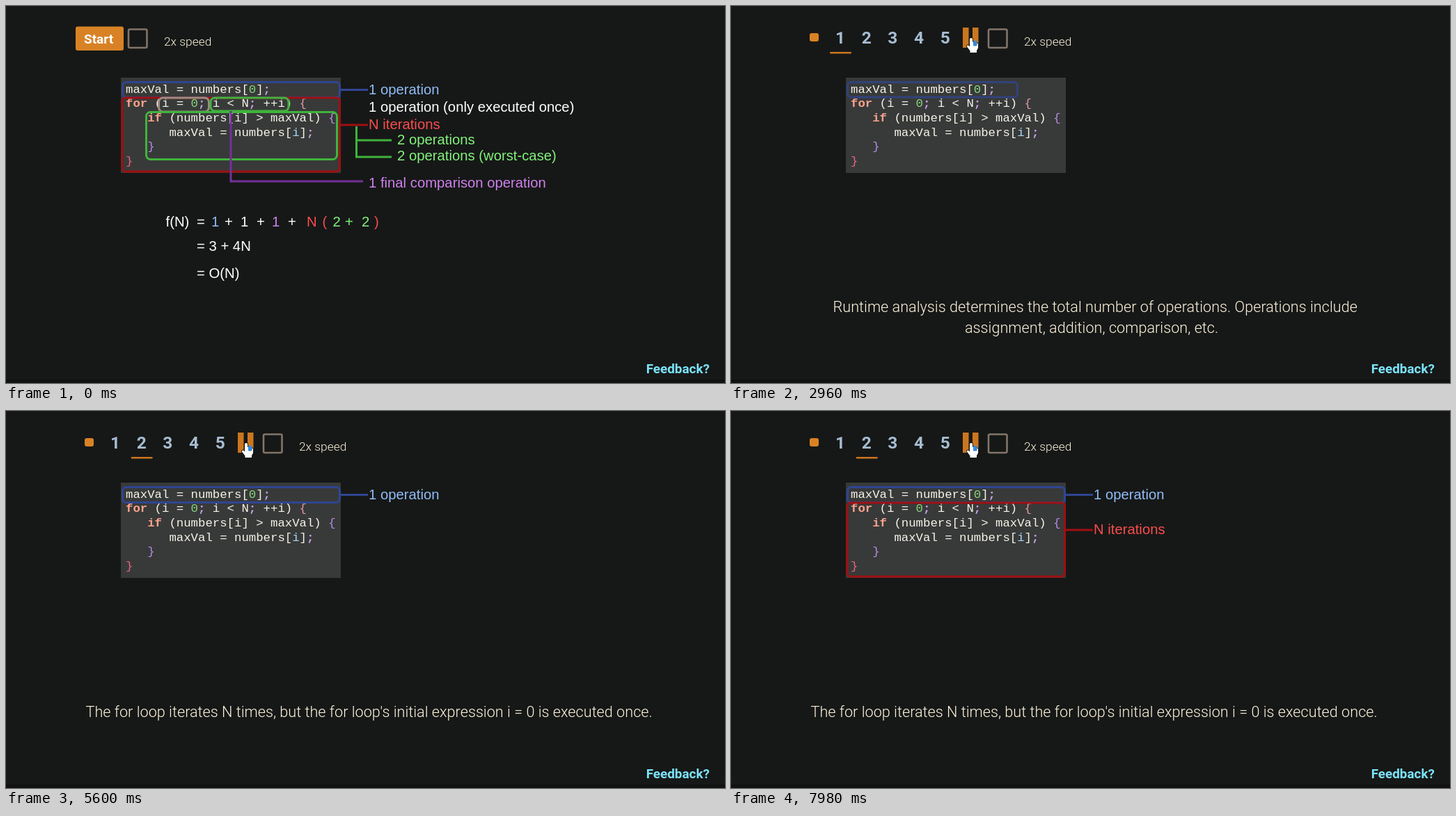
Write an HTML page with a canvas that moves like this. It is 1033 px wide and 542 px high and loops after 8000 ms.

```html
<!DOCTYPE html>
<html lang="en">
<head>
<meta charset="utf-8">
<title>Runtime analysis</title>
<style>
  html, body { margin: 0; width: 100%; height: 100%; overflow: hidden; background: #161817; }
  canvas { display: block; width: 1033px; height: 542px; }
</style>
</head>
<body>
<canvas id="stage" width="1033" height="542"></canvas>
<script>
const ctx = document.getElementById('stage').getContext('2d');
const LOOP = 8000;
const UI = 'Roboto, sans-serif';
const LABEL = '20.3px "Liberation Sans", Arial, sans-serif';
const MONO = '17.33px "Courier New", "Liberation Mono", monospace';
const C = {
  orange: '#d88225', control: '#cb761f', cream: '#fff4dd', blue: '#2f4592', blueText: '#91bcf8',
  red: '#a00f11', redText: '#f84d4d', green: '#40b33c', greenText: '#83f27c',
  purple: '#74309a', purpleText: '#cf80ee', tan: '#9c8c7e', box: '#82756a'
};
const BLUE_BOX = [167.5, 109.5, 312, 22, C.blue];
const RED_BOX = [167, 132, 312.5, 106, C.red];

const clamp = v => Math.max(0, Math.min(1, v));
const swing = (t, start, length) => 0.5 - Math.cos(Math.PI * clamp((t - start) / length)) / 2;
const mix = (a, b, k) => a + (b - a) * k;

function text(str, x, y, color, font = LABEL, align = 'left') {
  ctx.font = font;
  ctx.textAlign = align;
  ctx.fillStyle = color;
  ctx.fillText(str, x, y);
}

function fillBox(x, y, w, h, color, r = 0) {
  ctx.fillStyle = color;
  ctx.beginPath();
  ctx.roundRect(x, y, w, h, r);
  ctx.fill();
}

function frame(x, y, w, h, color, r = 5, width = 3) {
  ctx.strokeStyle = color;
  ctx.lineWidth = width;
  ctx.beginPath();
  ctx.roundRect(x, y, w, h, r);
  ctx.stroke();
}

function poly(points, color, width = 3) {
  ctx.strokeStyle = color;
  ctx.lineWidth = width;
  ctx.beginPath();
  points.forEach(([x, y]) => ctx.lineTo(x, y));
  ctx.stroke();
}

function faded(alpha, draw) {
  if (alpha <= 0) return;
  ctx.save();
  ctx.globalAlpha = alpha;
  draw();
  ctx.restore();
}

// Code runs: [line, column, text, kind]
const KINDS = { n: '#f6f3e9', k: '#ffa38c', g: '#86d67c', s: '#cda0ee', v: '#b98bea', o: '#e39aa8', p: '#ec6685', b: '#a8d8f8' };
const CODE = [
  [0, 0, 'maxVal = numbers[ ]', 'n'], [0, 17, '0', 'g'], [0, 19, ';', 's'],
  [1, 0, 'for', 'k'], [1, 4, '(i =', 'n'], [1, 9, '0', 'g'], [1, 10, ';', 's'],
  [1, 12, 'i < N', 'n'], [1, 17, ';', 's'], [1, 19, '++i)', 'n'], [1, 24, '{', 'o'],
  [2, 3, 'if', 'k'], [2, 6, '(numbers[i] > maxVal)', 'n'], [2, 28, '{', 'v'],
  [3, 6, 'maxVal = numbers[ ]', 'n'], [3, 23, 'i', 'b'], [3, 25, ';', 's'],
  [4, 3, '}', 'v'], [5, 0, '}', 'p']
];

function drawCode() {
  fillBox(165, 103, 316, 137, '#383a39');
  for (const [line, col, str, kind] of CODE) {
    text(str, 172 + col * 10.4, 124.7 + line * 20.6, KINDS[kind], ('ks'.includes(kind) ? 'bold ' : '') + MONO);
  }
}

function drawSpeed(x) {
  frame(x, 33.5, 26.5, 26.5, C.box, 2, 2.6);
  text('2x speed', x + 51, 56.5, C.cream, '300 17.35px ' + UI);
}

function drawSteps(step, paused) {
  fillBox(113, 39, 13, 12, C.orange, 3);
  for (let i = 0; i < 5; i++) {
    text(String(i + 1), 157 + i * 37.7, 54, '#a6bdd2', 'bold 24.5px ' + UI, 'center');
  }
  fillBox(142 + (step - 1) * 37.7, 66, 31, 2.6, C.control, 1);
  if (paused) {
    ctx.fillStyle = C.control;
    ctx.beginPath();
    ctx.moveTo(333, 32);
    ctx.lineTo(356, 46);
    ctx.lineTo(333, 60);
    ctx.fill();
  } else {
    fillBox(333, 31, 8.5, 29, C.control);
    fillBox(347, 31, 8.5, 29, C.control);
  }
  drawSpeed(370);
}

function drawResult() {
  const white = '#fff';
  frame(...BLUE_BOX);
  frame(...RED_BOX);
  frame(219.5, 132, 72, 20, C.tan, 6);
  frame(294, 132, 112, 19, C.green, 6);
  frame(201.5, 152.5, 274, 68, C.green, 6);
  poly([[481, 120.5], [520, 120.5]], C.blue);
  poly([[481, 171], [520, 171]], C.red);
  poly([[503.5, 173], [503.5, 217], [554, 217]], C.green);
  poly([[503.5, 193], [554, 193]], C.green);
  poly([[323, 151], [323, 252], [513, 252]], C.purple);

  text('1 operation', 521, 127, C.blueText);
  text('1 operation (only executed once)', 521, 152, white);
  text('N iterations', 521, 177, C.redText);
  text('2 operations', 562, 199, C.greenText);
  text('2 operations (worst-case)', 562, 222, C.greenText);
  text('1 final comparison operation', 521, 261, C.purpleText);

  const terms = [
    ['f(N)', 229.5, white], ['=', 274, white], ['1', 295, C.blueText], ['+', 314, white],
    ['1', 337, white], ['+', 360, white], ['1', 382, C.purpleText], ['+', 405, white],
    ['N', 432, C.redText], ['(', 454.5, C.redText], ['2', 469.5, C.greenText],
    ['+', 487, C.greenText], ['2', 511, C.greenText], [')', 529, C.redText]
  ];
  for (const [str, x, color] of terms) text(str, x, 317, color);
  text('= 3 + 4N', 274, 352, white);
  text('= O(N)', 274, 391, white);
}

function growFrame(t, start, [x, y, w, h, color]) {
  const k = swing(t, start, 1000);
  faded(k, () => frame(x, y, mix(14, w, k), mix(20, h, k), color));
}

function callout(t, start, str, baseline, lineY, color, textColor) {
  faded(swing(t, start, 800), () => {
    poly([[481, lineY], [520, lineY]], color);
    text(str, 521, baseline, textColor);
  });
}

function drawCaptions(t) {
  const font = '300 21.66px ' + UI;
  faded(swing(t, 1500, 370) * (1 - swing(t, 4930, 300)), () => {
    text('Runtime analysis determines the total number of operations. Operations include', 146.5, 440, C.cream, font);
    text('assignment, addition, comparison, etc.', 336, 470, C.cream, font);
  });
  faded(swing(t, 5230, 360), () =>
    text('The for loop iterates N times, but the for loop\'s initial expression i = 0 is executed once.', 114.5, 440, C.cream, font));
}

const ARROW = new Path2D('M0 0V15L3.4 12L6 18L8.6 17L6 11H10.5Z');
const HAND = new Path2D('M-2 1.5Q-2 0 0 0Q2 0 2 1.5V6Q4 4.5 5 6.5Q7 5.5 8 7.5Q10 7 10 9V14Q9.5 16 8 18V21H-1.5V18.5L-6 12.5Q-6.5 10 -4 10.5L-2 12.5Z');

function drawPointer(x, y, hand, accent) {
  ctx.save();
  ctx.translate(x, y);
  const shape = hand ? HAND : ARROW;
  ctx.lineJoin = 'round';
  ctx.lineWidth = 1.6;
  ctx.strokeStyle = '#111';
  ctx.stroke(shape);
  ctx.fillStyle = '#fff';
  ctx.fill(shape);
  if (accent) fillBox(3, 4, 5.5, 7.5, '#3388d8', 1);
  ctx.restore();
}

function curve(k, a, b, c) {
  return (1 - k) * (1 - k) * a + 2 * k * (1 - k) * b + k * k * c;
}

function drawCursor(t, paused) {
  if (t < 70) return;
  if (t < 1020) {
    const k = swing(t, 30, 810);
    const x = curve(k, 1000, 420, 146);
    drawPointer(x, curve(k, 509, -60, 47), x < 169);
  } else if (t < 1500) {
    const k = swing(t, 1000, 250);
    drawPointer(mix(146, 137, k), mix(47, 54, k), false);
  } else {
    const k = swing(t, 1500, 800);
    const x = mix(137, 345, k);
    drawPointer(x, curve(k, 54, 0, 46), x > 333, x > 340 && !paused);
  }
}

function draw(t) {
  fillBox(0, 0, 1033, 542, '#161817');
  fillBox(0, 537, 1033, 5, '#101211');
  text('Feedback?', 919.7, 528, '#7be3fb', 'bold 18.85px ' + UI);
  drawCode();

  const paused = t >= 4280 && t < 4970;
  if (t < 1020) {
    fillBox(100, 29.5, 69, 34.5, C.orange, 3);
    text('Start', 133, 54, '#fff', 'bold 19px ' + UI, 'center');
    drawSpeed(176);
    drawResult();
  } else {
    drawSteps(t < 4970 ? 1 : 2, paused);
    growFrame(t, 2278, BLUE_BOX);
    growFrame(t, 6045, RED_BOX);
    callout(t, 3400, '1 operation', 127, 120.5, C.blue, C.blueText);
    callout(t, 7180, 'N iterations', 177, 171, C.red, C.redText);
    drawCaptions(t);
  }
  drawCursor(t, paused);
}

const begin = performance.now();
function tick() {
  draw((performance.now() - begin) % LOOP);
  requestAnimationFrame(tick);
}
tick();
</script>
</body>
</html>
```
